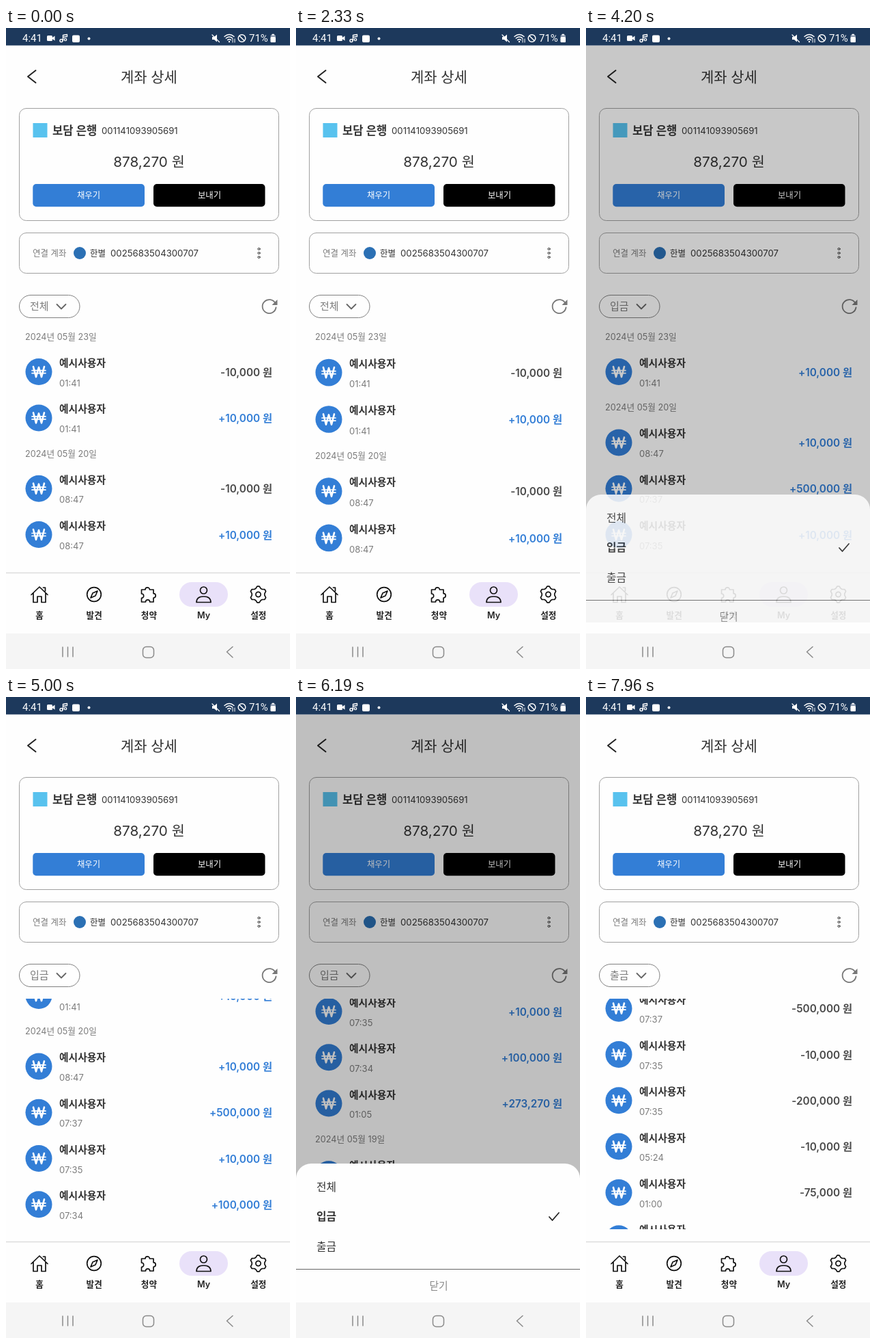
These frames come from a looping animation (416 by 937 pixels, 8 s). An HTML page:

```html
<!DOCTYPE html>
<html lang="ko">
<head>
<meta charset="utf-8">
<style>
  html, body { margin: 0; width: 100%; height: 100%; overflow: hidden; background: #fefefe; }
  svg { display: block; width: 416px; height: 937px; fill: none; stroke-linecap: round; stroke-linejoin: round; }
  text { font-family: Inter, "Noto Sans CJK KR", "Noto Sans CJK", sans-serif; white-space: pre; }
  .sys { font-family: Roboto, sans-serif; }
</style>
</head>
<body>
<svg id="stage" viewBox="0 0 416 937"></svg>
<script>
const BLUE = '#337ed6', DARK = '#333', GRAY = '#7c7c7c';
const FILTERS = ['전체', '입금', '출금'];
const LOOP = 8000, STEP = 97;

// day, then [time, amount] rows
const HISTORY = [
  ['23', [['01:41', -10000], ['01:41', 10000]]],
  ['20', [['08:47', -10000], ['08:47', 10000], ['07:37', 500000], ['07:37', -500000],
    ['07:35', -10000], ['07:35', -200000], ['07:35', 10000], ['07:34', 100000],
    ['05:24', -10000], ['01:05', 273270], ['01:00', -75000], ['00:52', -10000]]],
  ['19', [['22:10', 10000], ['21:40', -20000], ['20:15', 50000]]]
];

// [time, value] points, linear in between
const SCROLL = [[289, 0], [290, 66], [484, 215], [678, 280], [969, 308], [1159, 308], [1160, 242],
  [1354, 95], [1548, 30], [1930, 0], [4999, 0], [5000, 66], [5194, 215], [5400, 262],
  [5776, 281], [6779, 281], [6780, 0], [7769, 0], [7770, 66], [7960, 218]];
const STRETCH = [[1930, 0], [2130, .04], [2330, .0165], [2520, 0]];
const SHEET = [[3419, 0], [3420, .1], [3610, 1], [4199, 1], [4200, .85], [4490, 0],
  [5986, 0], [5987, .1], [6181, 1], [6780, 1], [7165, 0]];
const CUES = [0, 290, 1160, 2330, 3420, 4200, 5000, 5890, 6780, 7770, 7960];

// cy is the vertical middle of the glyphs
const text = (x, cy, size, str, fill = DARK, weight = 400, anchor = 'start', cls = '') =>
  `<text class="${cls}" x="${x}" y="${cy + size * .365}" font-size="${size}" fill="${fill}" font-weight="${weight}" text-anchor="${anchor}">${str}</text>`;
const mid = (x, cy, size, str, fill, weight) => text(x, cy, size, str, fill, weight, 'middle');
const rect = (x, y, w, h, r, attrs) => `<rect x="${x}" y="${y}" width="${w}" height="${h}" rx="${r}" ${attrs}/>`;
const circle = (x, y, r, attrs) => `<circle cx="${x}" cy="${y}" r="${r}" ${attrs}/>`;
const line = (d, color, width) => `<path d="${d}" stroke="${color}" stroke-width="${width}"/>`;

function statusBar() {
  const w = '#fff', fill = `fill="${w}"`;
  return rect(0, 0, 416, 25.5, 0, 'fill="#1d395c"') +
    text(24, 15, 15, '4:41', w, 400, 'start', 'sys') +
    rect(60, 11, 8, 8, 1.5, fill) + `<path d="M68 14l3.5-2.5v7L68 16z" ${fill}/>` +
    line('M83.5 18v-7.5l6-1v3l-6 1', w, 1.4) +
    circle(81, 18.5, 2, `stroke="${w}" stroke-width="1.4"`) + circle(87, 17, 1.7, `stroke="${w}" stroke-width="1.3"`) +
    rect(97, 10.5, 11, 10.5, 2, fill) + circle(121.5, 15.5, 2, fill) +
    `<path d="M302 13h3l4-3.5v11L305 17h-3z" ${fill}/>` + line('M302 10l10.5 10.5', w, 1.3) +
    line('M320 12.5q7-6 14 0M322.3 15q4.7-4 9.4 0M324.6 17.5q2.4-2 4.8 0', w, 1.5) +
    circle(327, 20, 1.2, fill) + line('M332 16v5M335 21v-5', w, 1) +
    circle(345.5, 15, 5.3, `stroke="${w}" stroke-width="1.5"`) + line('M342 11.5l7 7', w, 1.5) +
    text(356, 15, 15, '71%', w, 400, 'start', 'sys') +
    rect(387.5, 10, 7.5, 11, 1.5, 'fill="#8d9bb0"') + rect(387.5, 13, 7.5, 8, 1.5, fill) + rect(389.5, 8.8, 3.5, 2, .5, fill);
}

function account() {
  const box = 'stroke="#a0a0a0" stroke-width="1"';
  return line('M43.5 62L32 71l11.5 9', '#222', 2) +
    mid(209.5, 71, 21, '계좌 상세', DARK, 500) +
    rect(19.5, 117.5, 380, 164, 10, box) +
    rect(39.5, 139, 21, 21, 0, 'fill="#58c2ee"') +
    text(68, 150, 16.6, '보담 은행', DARK, 600) +
    text(140, 150.5, 13.2, '001141093905691', DARK) +
    mid(209.5, 195.5, 20.7, '878,270 원', DARK) +
    rect(39.3, 228, 163.7, 33.2, 5, `fill="${BLUE}"`) + mid(121, 244, 12.4, '채우기', '#fff', 500) +
    rect(216, 228, 163.5, 33.2, 5, 'fill="#000"') + mid(298, 244, 12.4, '보내기', '#fff', 500) +
    rect(19.5, 299.5, 380, 59, 10, box) +
    text(39, 329, 12.5, '연결 계좌', GRAY) +
    circle(108, 329, 9, 'fill="#2b70b4"') +
    text(123, 329, 12.5, '한별', DARK, 500) +
    text(153, 329, 13.2, '0025683504300707', DARK) +
    [323, 329, 335].map(y => circle(370.5, y, 1.5, 'stroke="#222" stroke-width="1"')).join('') +
    rect(19.5, 390.5, 88.5, 33, 16.5, 'stroke="#808080"') +
    `<g id="chip"></g>` + line('M74.5 404l6.5 6.5 6.5-6.5', '#666', 1.8) +
    line('M394.5 402.5A10 10 0 1 0 395.5 408.5', '#777', 1.8) +
    `<path d="M397.5 397v8h-8z" fill="#777"/>`;
}

function row(cy, [time, amount]) {
  const sum = (amount < 0 ? '-' : '+') + Math.abs(amount).toLocaleString('en-US') + ' 원';
  return circle(48, cy, 19.5, `fill="${BLUE}"`) +
    line(`M40 ${cy - 7.5}l4 15 4-14 4 14 4-15`, '#fff', 2.6) +
    line(`M38 ${cy - 2}h20M38 ${cy + 2}h20`, '#fff', 1.7) +
    text(78, cy - 13, 14.8, '예시사용자', DARK, 600) +
    text(78, cy + 16.5, 13, time, GRAY) +
    text(390, cy + .5, 15.3, sum, amount < 0 ? '#4a4a4a' : BLUE, 600, 'end');
}

function list(filter) {
  const sign = [0, 1, -1][filter];
  let y = 433, out = '';
  for (const [day, rows] of HISTORY) {
    out += text(28, y + 18.3, 12.7, `2024년 05월 ${day}일`, GRAY);
    y += 36;
    for (const r of rows) {
      if (r[1] * sign < 0) continue;
      out += row(y + 33.6, r);
      y += 67.3;
    }
  }
  return out;
}

function tabs() {
  const gear = Array.from({ length: 24 }, (_, i) => {
    const a = (i - .5) * Math.PI / 12, r = i % 4 < 2 ? 12 : 9.4;
    return (369.5 + r * Math.sin(a)).toFixed(1) + ' ' + (828 - r * Math.cos(a)).toFixed(1);
  }).join('L');
  const ink = d => line(d, '#111', 1.7);
  const ring = (x, y, r) => circle(x, y, r, 'stroke="#111" stroke-width="1.7"');
  return rect(0, 796, 416, 89, 0, 'fill="#fefefe"') + line('M0 796.5H416', '#dcdcdc', 1.5) +
    rect(254, 810, 71, 36, 18, 'fill="#e9e1f9"') +
    ink('M37 828.5L49 817l12 11.5M40 826v13.5h6v-8.5h6v8.5h6V826M54.5 818h3v5') +
    ring(129, 828, 10.3) + ink('M134 823l-3 7-7 3 3-7z') +
    ink('M198.5 821h5.5a3.2 3.2 0 1 1 6.4 0h5.6v5.6a3.2 3.2 0 1 1 0 6.4v6h-5.3a3.1 3.1 0 0 0-6.2 0h-6v-5.6a3.2 3.2 0 0 0 0-6.4z') +
    ring(289.5, 822, 5) + ink('M279 839.5c0-6.5 4-8.5 10.5-8.5s10.5 2 10.5 8.5z') +
    ink('M' + gear + 'z') + ring(369.5, 828, 3.6) +
    ['홈', '발견', '청약', 'My', '설정'].map((s, i) => mid(49 + 80.2 * i, 858.5, 12.6, s, '#222', 600)).join('');
}

function navBar() {
  return rect(0, 885, 416, 52, 0, 'fill="#f5f5f5"') +
    line('M83 905v14M90.5 905v14M98 905v14M332 904.5l-8.5 7.5 8.5 8', '#8a8a8a', 1.5) +
    rect(200.5, 904.5, 16, 16, 5, 'stroke="#8a8a8a" stroke-width="1.5"');
}

function options(filter) {
  return FILTERS.map((s, i) => text(30, 716 + 43.5 * i, 15.8, s, DARK, i === filter ? 600 : 400)).join('') +
    line(`M371 ${760 + 43.5 * (filter - 1)}l4.5 5 9.5-11`, '#222', 1.7);
}

const $ = id => document.getElementById(id);
$('stage').innerHTML =
  `<clipPath id="view"><rect y="441" width="416" height="337"/></clipPath>` +
  account() +
  `<g clip-path="url(#view)"><g id="list"></g></g>` +
  tabs() +
  `<g id="shade">${rect(0, 25.5, 416, 843.5, 0, 'fill="#000"')}</g>` +
  `<g id="sheet"><path d="M0 885V704a22 22 0 0 1 22-22H394a22 22 0 0 1 22 22V885z" fill="#fefefe"/>` +
  `<g id="options"></g>${line('M0 836.5H416', '#666', 1)}${mid(209, 861, 14.8, '닫기', '#888')}</g>` +
  navBar() + statusBar();

function at(keys, t) {
  const i = keys.findIndex(k => k[0] > t);
  if (i === 0) return keys[0][1];
  if (i < 0) return keys[keys.length - 1][1];
  const [t0, a] = keys[i - 1], [t1, b] = keys[i];
  return a + (b - a) * (t - t0) / (t1 - t0);
}

// the screen refreshes about ten times a second
function snap(t) {
  const start = CUES.filter(c => c <= t).pop();
  return start + Math.floor((t - start) / STEP) * STEP;
}

let shown = -1;
function draw() {
  const t = snap(performance.now() % LOOP);
  const filter = t < 4200 ? 0 : t < 6780 ? 1 : 2;
  if (filter !== shown) {
    shown = filter;
    $('list').innerHTML = list(filter);
    $('options').innerHTML = options(filter);
    $('chip').innerHTML = text(35, 407, 15, FILTERS[filter], GRAY);
  }
  const open = at(SHEET, t);
  $('list').setAttribute('transform',
    `translate(0 441) scale(1 ${1 + at(STRETCH, t)}) translate(0 ${-441 - at(SCROLL, t)})`);
  $('shade').setAttribute('opacity', open * .25);
  $('sheet').setAttribute('opacity', open);
  requestAnimationFrame(draw);
}
draw();
</script>
</body>
</html>
```
